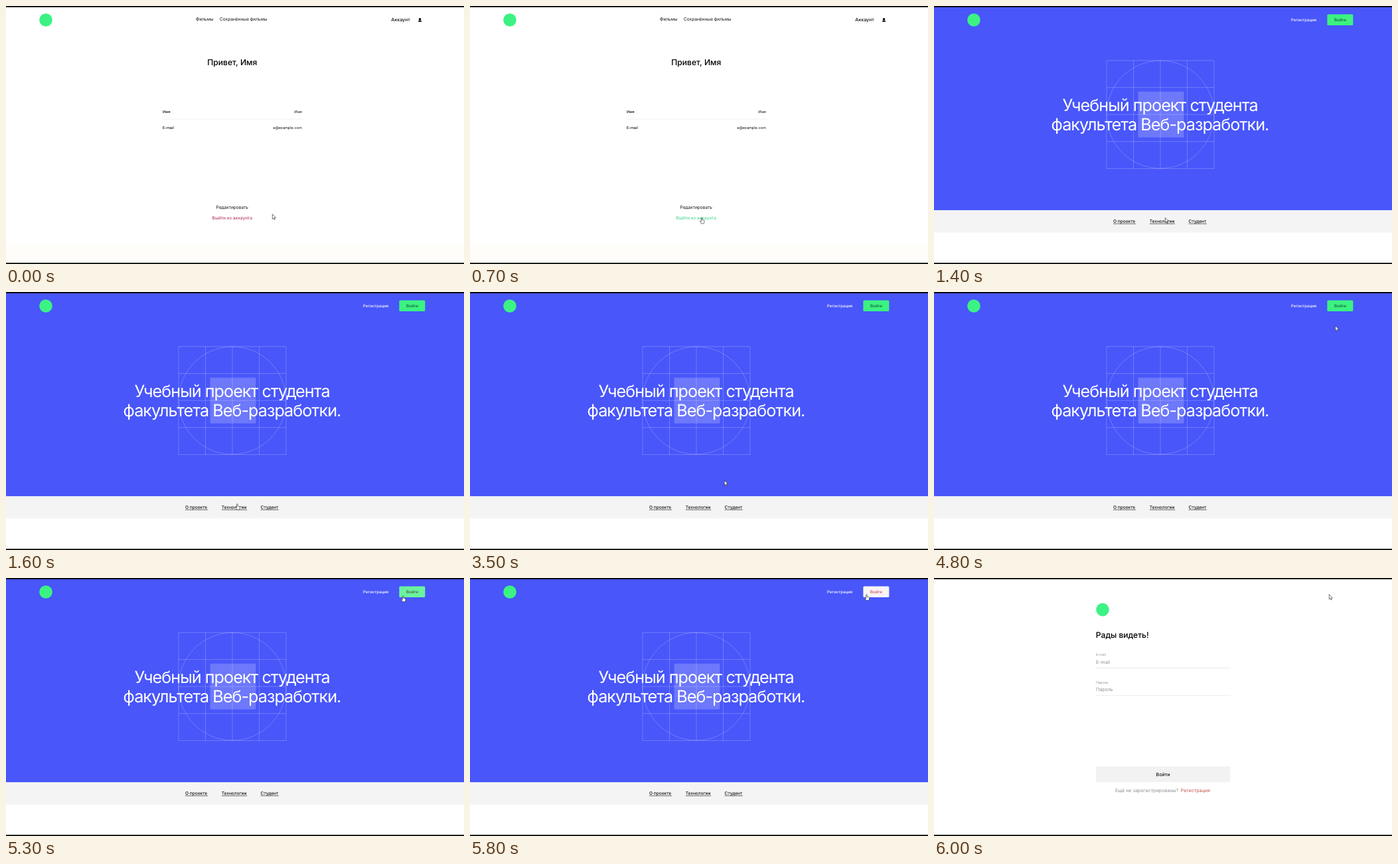
An HTML page for the animation above (6.2 s loop, 690 px wide and 388 px high).

```html
<!DOCTYPE html>
<html lang="ru">
<head>
<meta charset="utf-8">
<title>Личный кабинет</title>
<style>
  html, body { margin: 0; width: 100%; height: 100%; overflow: hidden; background: #fff; }
  svg { display: block; width: 100%; height: 100%; }
  text { font-family: Inter, "Open Sans", sans-serif; font-size: 6.57px; fill: #111; text-rendering: geometricPrecision; }
  .mid { text-anchor: middle; }
  .end { text-anchor: end; }
  .bold { font-weight: 500; }
  .title { font-size: 12.12px; font-weight: 500; fill: #000; }
  .hero { font-size: 25.25px; letter-spacing: -1.01px; fill: #fff; }
  .s10 { font-size: 5.05px; }
  .s11 { font-size: 5.56px; }
  .s12 { font-size: 6.06px; }
  .s14 { font-size: 7.07px; }
  .grey { fill: #8f8f8f; }
  .logo { fill: #3cf283; }
</style>
</head>
<body>
<svg viewBox="0 0 690 388">
  <rect width="690" height="388" fill="#fff"/>

  <g id="profile">
    <rect y="358" width="690" height="28" fill="#fefdf9"/>
    <circle class="logo" cx="60" cy="21" r="9.8"/>
    <text x="286" y="22.2">Фильмы</text>
    <text x="322" y="22.2">Сохранённые фильмы</text>
    <text class="s14 bold" x="580.3" y="23">Аккаунт</text>
    <g fill="#0a0a0a">
      <circle cx="623.6" cy="19.8" r="1.8"/>
      <path d="M620.9 23.8q0-2 1.8-2.4h1.8q1.8.4 1.8 2.4z"/>
    </g>
    <text class="title mid" x="340.8" y="89.4">Привет, Имя</text>
    <text class="s11 bold" x="236" y="160.5">Имя</text>
    <text class="s11 end" x="445.8" y="160.5">Имя</text>
    <rect x="236" y="169.8" width="210" height=".6" fill="#e6e6e6"/>
    <text class="s11 bold" x="236" y="184.8">E-mail</text>
    <text class="s11 end" x="445.8" y="184.8">a@example.com</text>
    <text class="mid" x="340.8" y="304.5">Редактировать</text>
    <text id="logout" class="mid bold" x="340.8" y="321">Выйти из аккаунта</text>
  </g>

  <g id="landing">
    <rect y="1" width="690" height="306.3" fill="#4856fa"/>
    <rect y="307.3" width="690" height="33.2" fill="#f4f4f4"/>
    <circle class="logo" cx="60" cy="21" r="9.8"/>
    <text class="s12 bold" x="538" y="22.8" style="fill:#fff">Регистрация</text>
    <rect id="enter" x="592.4" y="12.4" width="39" height="16.6" rx="1.5"/>
    <text id="enterText" class="s12 mid" x="611.9" y="22.8">Войти</text>
    <g fill="none" stroke="#fff" stroke-opacity=".28" stroke-width=".8">
      <rect x="260" y="82" width="162" height="162.4"/>
      <path d="M300.5 82v162.4M341 82v162.4M381.5 82v162.4M260 122.6h162M260 163.2h162M260 203.8h162"/>
      <circle cx="341" cy="163.2" r="81"/>
    </g>
    <rect x="307.5" y="128.7" width="69" height="69" fill="#fff" fill-opacity=".2"/>
    <text class="hero mid" x="340.5" y="158">Учебный проект студента</text>
    <text class="hero mid" x="340.5" y="187.4">факультета Веб-разработки.</text>
    <text class="bold" x="270" y="326.2">О проекте</text>
    <text class="bold" x="324.8" y="326.2">Технологии</text>
    <text class="bold" x="383.6" y="326.2">Студент</text>
    <path d="M270 327.6h34M324.8 327.6h38.4M383.6 327.6h27.4" stroke="#111" stroke-width=".6"/>
  </g>

  <g id="login">
    <circle class="logo" cx="254" cy="47.6" r="9.8"/>
    <text class="title" x="243.8" y="89.5">Рады видеть!</text>
    <text class="s10 grey" x="244" y="117.3">E-mail</text>
    <text class="s14 grey" x="244" y="128.6">E-mail</text>
    <text class="s10 grey" x="244" y="158.8">Пароль</text>
    <text class="s14 grey" x="244" y="169.8">Пароль</text>
    <path d="M244 135.4h203M244 176.8h203" stroke="#e2e2e2" stroke-width=".7"/>
    <rect x="244" y="283.5" width="202.4" height="23.6" rx="1.5" fill="#f2f2f2"/>
    <text class="s14 mid bold" x="345" y="297.7">Войти</text>
    <text class="s14 grey" x="273" y="321.8">Ещё не зарегистрированы?</text>
    <text class="s14" x="371.8" y="321.8" style="fill:#c4544c">Регистрация</text>
  </g>

  <rect width="690" height="1.8" fill="#000"/>
  <rect y="386.2" width="690" height="1.8" fill="#080c08"/>

  <g id="cursor" fill="#fff" stroke="#1c1c22" stroke-width=".6" stroke-linejoin="round">
    <path id="arrow" d="M0 0V7.4L1.7 5.9 2.8 8.4 4 7.9 2.9 5.4H5.1Z"/>
    <path id="hand" d="M-.7.6Q0-.4.7.6V3.6Q1.3 3 1.9 3.9 2.5 3.4 3 4.2 3.8 3.9 4 4.9V7L3.1 9.2H-.5L-2.5 5.7Q-2.3 4.5-.7 6Z"/>
  </g>
</svg>
<script>
  const LOOP = 6200, STEP = 100;
  const el = id => document.getElementById(id);
  const clamp = v => Math.max(0, Math.min(1, v));
  const smooth = k => k * k * (3 - 2 * k);

  // pointer stops: time, x, y
  const stops = [
    [0, 401.3, 313], [700, 349, 318], [1300, 349, 318], [1400, 348.4, 318.4],
    [3400, 348.4, 318.4], [3500, 383.3, 283.4], [3600, 449, 230], [3700, 506, 196],
    [3800, 529, 187], [4000, 529, 187], [4700, 605.4, 53], [4800, 604.7, 50.8],
    [5400, 597.5, 24.6], [5900, 597.5, 24.6], [6000, 595.3, 24.6], [LOOP, 595.3, 24.6]
  ];
  const handTimes = [[400, 1400], [1500, 3500], [5300, 6000]];

  const pink = [184, 66, 106], mint = [78, 217, 155];
  const green = [59, 242, 129], pale = [247, 245, 246];
  const dark = [23, 52, 42], red = [200, 44, 66];

  function mix(a, b, k) {
    return `rgb(${a.map((v, i) => Math.round(v + (b[i] - v) * k))})`;
  }

  function pointer(t) {
    const i = stops.findIndex(s => s[0] > t);
    const [t0, x0, y0] = stops[i - 1], [t1, x1, y1] = stops[i];
    const k = smooth((t - t0) / (t1 - t0));
    return [x0 + (x1 - x0) * k, y0 + (y1 - y0) * k];
  }

  function show(id, on) {
    el(id).style.display = on ? "" : "none";
  }

  function draw(time) {
    const t = Math.floor((time % LOOP) / STEP) * STEP;
    show("profile", t < 1400);
    show("landing", t >= 1400 && t < 6000);
    show("login", t >= 6000);

    el("logout").style.fill = mix(pink, mint, clamp((t - 300) / 400));
    const hover = clamp((t - 5200) / 400);
    el("enter").style.fill = mix(green, pale, hover);
    el("enterText").style.fill = mix(dark, red, t < 5800 ? hover * 0.92 : 1);

    const hand = handTimes.some(([a, b]) => t >= a && t < b);
    show("hand", hand);
    show("arrow", !hand);
    el("cursor").setAttribute("transform", `translate(${pointer(t)})`);
  }

  function tick(now) {
    draw(now);
    requestAnimationFrame(tick);
  }
  draw(0);
  requestAnimationFrame(tick);
</script>
</body>
</html>
```
